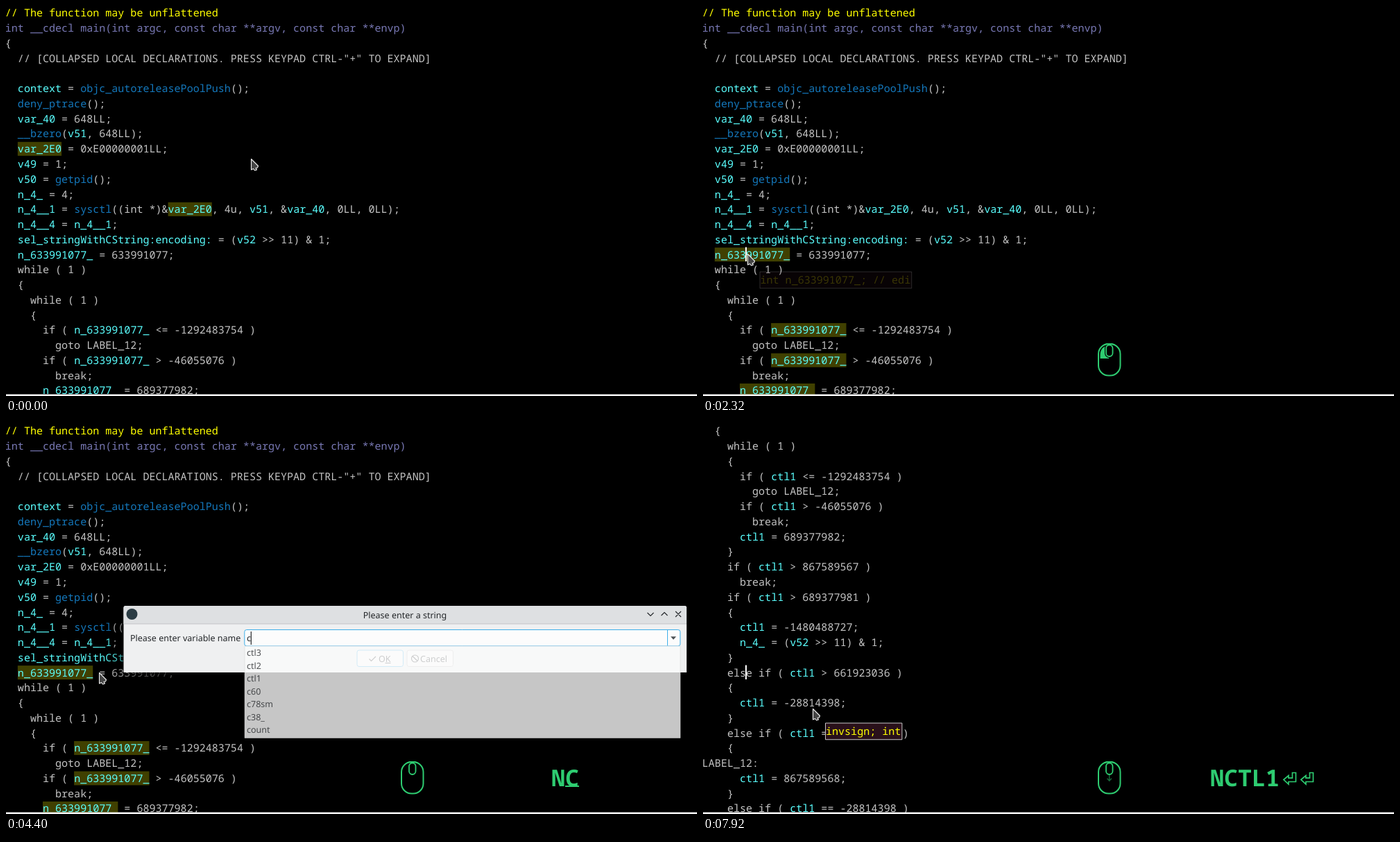
Write an HTML page with a canvas that moves like this. It is 996 px wide and 562 px high and loops after 8000 ms.

```html
<!DOCTYPE html>
<html lang="en">
<head>
<meta charset="utf-8">
<title>Renaming a variable</title>
<style>
html, body { margin: 0; width: 100%; height: 100%; overflow: hidden; background: #000; }
canvas { display: block; }
</style>
</head>
<body>
<canvas id="stage" width="996" height="562"></canvas>
<script>
const ctx = document.getElementById('stage').getContext('2d');
ctx.textRendering = 'geometricPrecision';

const LOOP = 8000, STEP = 80, BLINK = 267;
const CHAR = 9.03, LINE = 21.76, LEFT = -1.2, BASE = 15.4, CODE_BOTTOM = 560;
const MONO = '15.05px "Noto Sans Mono", monospace';
const SANS = '12.5px "Noto Sans", sans-serif';
const KEYS = 'bold 33.3px "Noto Sans Mono", monospace';
const GREY = '#c4c4c4', CYAN = '#5affff', BLUE = '#1478bc', SLATE = '#7878b4',
      YELLOW = '#ffff00', GREEN = '#2ecc71', INK = '#232629', ACCENT = '#3daee9';
const OLD_NAME = 'n_633991077_', NEW_NAME = 'ctl1';

const CODE = `// The function may be unflattened
int __cdecl main(int argc, const char **argv, const char **envp)
{
  // [COLLAPSED LOCAL DECLARATIONS. PRESS KEYPAD CTRL-"+" TO EXPAND]

  context = objc_autoreleasePoolPush();
  deny_ptrace();
  var_40 = 648LL;
  __bzero(v51, 648LL);
  var_2E0 = 0xE00000001LL;
  v49 = 1;
  v50 = getpid();
  n_4_ = 4;
  n_4__1 = sysctl((int *)&var_2E0, 4u, v51, &var_40, 0LL, 0LL);
  n_4__4 = n_4__1;
  sel_stringWithCString:encoding: = (v52 >> 11) & 1;
  @ = 633991077;
  while ( 1 )
  {
    while ( 1 )
    {
      if ( @ <= -1292483754 )
        goto LABEL_12;
      if ( @ > -46055076 )
        break;
      @ = 689377982;
    }
    if ( @ > 867589567 )
      break;
    if ( @ > 689377981 )
    {
      @ = -1480488727;
      n_4_ = (v52 >> 11) & 1;
    }
    else if ( @ > 661923036 )
    {
      @ = -28814398;
    }
    else if ( @ == 661923037 )
    {
LABEL_12:
      @ = 867589568;
    }
    else if ( @ == -28814398 )`;
const TOKEN = /\b(objc_autoreleasePoolPush|deny_ptrace|__bzero|getpid|sysctl)\b|\b(context|var_\w+|v\d\d|n_\w+|ctl1)\b|sel_\w+:encoding:/g;

const clamp = v => Math.min(1, Math.max(0, v));
const ramp = (t, a, b) => clamp((t - a) / (b - a));
const during = (t, a, b) => t >= a && t < b;
const pulse = (t, in0, in1, out0, out1) => Math.min(ramp(t, in0, in1), 1 - ramp(t, out0, out1));
const blinkOn = (t, since) => Math.floor((t - since) / BLINK) % 2 === 0;
const smooth = u => u * u * (3 - 2 * u);
const accelerate = u => u ** 1.8;

function rect(x, y, w, h, color) {
  ctx.fillStyle = color;
  ctx.fillRect(x, y, w, h);
}

function text(str, x, y, color, font, align = 'left') {
  ctx.font = font;
  ctx.fillStyle = color;
  ctx.textAlign = align;
  ctx.fillText(str, x, y);
}

function box(x, y, w, h, r, fill, stroke, width = 1) {
  ctx.beginPath();
  ctx.roundRect(x, y, w, h, r);
  if (fill) { ctx.fillStyle = fill; ctx.fill(); }
  if (stroke) { ctx.strokeStyle = stroke; ctx.lineWidth = width; ctx.stroke(); }
}

function line(path, color, width = 1) {
  ctx.strokeStyle = color;
  ctx.lineWidth = width;
  ctx.stroke(new Path2D(path));
}

function withAlpha(alpha, draw) {
  if (alpha <= 0) return;
  ctx.save();
  ctx.globalAlpha *= alpha;
  draw();
  ctx.restore();
}

// Pointer stops: time, x, y, easing towards that stop
const STOPS = [
  [40, 353, 220], [500, 107, 8, smooth], [640, 107, 8, smooth], [1040, 316, 7, accelerate],
  [1440, 316, 7, smooth], [2000, 64, 357, smooth], [2480, 64, 357, smooth],
  [2720, 134, 358, smooth], [7260, 134, 358, smooth], [7500, 158, 410, smooth]
];

function pointerAt(t) {
  const next = STOPS.findIndex(s => s[0] > t);
  if (next === 0) return STOPS[0].slice(1, 3);
  if (next < 0) return STOPS.at(-1).slice(1, 3);
  const [t0, x0, y0] = STOPS[next - 1], [t1, x1, y1, ease] = STOPS[next];
  const u = ease(ramp(t, t0, t1));
  return [x0 + (x1 - x0) * u, y0 + (y1 - y0) * u];
}

function drawCode(t, pointerX) {
  const name = t < 6160 ? OLD_NAME : NEW_NAME;
  const top = 3 * Math.floor(clamp((t - 7280) / 480) * 6);
  const marked = t < 600 ? 'var_2E0' : during(t, 2160, 6160) ? OLD_NAME : null;
  ctx.save();
  ctx.beginPath();
  ctx.rect(0, 0, 996, CODE_BOTTOM);
  ctx.clip();
  CODE.replaceAll('@', name).split('\n').slice(top, top + 26).forEach((row, i) => {
    const y = i * LINE;
    const put = (str, col, color) => text(str, LEFT + col * CHAR, y + BASE, color, MONO);
    const index = top + i;
    if (index < 2) return put(row, 0, index ? SLATE : YELLOW);
    let col = 0;
    for (const m of row.matchAll(TOKEN)) {
      put(row.slice(col, m.index), col, GREY);
      if (m[0] === marked) rect(LEFT + m.index * CHAR, y, m[0].length * CHAR, 20, '#404000');
      put(m[0], m.index, m[1] ? BLUE : CYAN);
      col = m.index + m[0].length;
    }
    put(row.slice(col), col, GREY);
  });
  if (during(t, 640, 2160)) drawSelection(t, pointerX);
  const caret = during(t, 2160, 3500) && (t < 2419 || blinkOn(t, 2419)) || t >= 6180 && blinkOn(t, 6180);
  if (caret) rect(61, 347.5, 2, 20.5, '#fff');
  ctx.restore();
  rect(0, CODE_BOTTOM - .5, 996, 3, '#f4f4f4');
}

function drawSelection(t, pointerX) {
  const first = 12;
  const last = t < 1040 ? Math.max(first, Math.round((pointerX - LEFT) / CHAR)) : 35;
  const x = LEFT + first * CHAR;
  rect(x, 0, (last - first) * CHAR, 20, '#a6a6a6');
  text(CODE.split('\n')[0].slice(first, last), x, BASE, '#fff', MONO);
  if (t < 1040 || blinkOn(t, 1040)) rect(LEFT + last * CHAR - 1, 0, 2, 20, '#fff');
}

function drawTooltip(alpha, x, y, rows) {
  withAlpha(alpha, () => {
    const w = Math.max(...rows.map(r => r.length)) * CHAR + 2;
    box(x + .5, y + .5, w, rows.length * LINE + 2, 0, '#29101a', '#c8c8c8');
    rows.forEach((r, i) => text(r, x + 1, y + 17 + i * LINE, YELLOW, MONO));
  });
}

function drawTooltips(t) {
  drawTooltip(pulse(t, 1170, 1320, 1440, 1620), 333.5, 27.5, [
    '',
    '   0: 0004 edi        int argc;',
    '   1: 0008 rsi        const char **argv;',
    '   2: 0008 rdx        const char **envp;',
    '  RET 0004 eax        int;',
    '  TOTAL STKARGS SIZE: 0'
  ]);
  drawTooltip(pulse(t, 2290, 2440, 2500, 2680), 81.5, 382.5, ['int ' + OLD_NAME + '; // edi']);
  drawTooltip(pulse(t, 2800, 2950, 3480, 3600), 151.5, 377.5, ['int']);
  drawTooltip(ramp(t, 7760, 7910), 176, 430.5, ['invsign; int']);
}

function typedName(t) {
  if (t < 4320) return OLD_NAME;
  return NEW_NAME.slice(0, [4320, 4800, 4960, 5040].filter(k => t >= k).length);
}

function drawDialog(t) {
  const name = typedName(t);
  ctx.save();
  ctx.shadowColor = 'rgba(0,0,0,.95)';
  ctx.shadowBlur = 34;
  ctx.shadowOffsetY = 12;
  box(169.5, 262, 811.5, 96, [3, 3, 0, 0], '#eff0f1');
  ctx.restore();
  box(169.5, 262, 811.5, 26, [3, 3, 0, 0], '#dee0e2');
  rect(169.5, 287.5, 811.5, 1, '#c3c5c7');
  ctx.beginPath();
  ctx.arc(181.5, 274, 8, 0, 7);
  ctx.fillStyle = '#2b3c44';
  ctx.fill();
  text('Please enter a string', 575, 279.5, INK, SANS, 'center');
  line('M924.5 272l4.5 4.5 4.5-4.5M944.5 276l4.5-4.5 4.5 4.5M965 270l8 8m0-8l-8 8', INK, 1.1);

  text('Please enter variable name', 179, 313.3, INK, SANS);
  box(343.8, 296.5, 628, 23.5, 3, '#fcfcfc', ACCENT);
  line('M953.5 297v22.5', ACCENT);
  ctx.fillStyle = '#4d5256';
  ctx.fill(new Path2D('M958 306.3h8l-4 4.4z'));
  ctx.font = SANS;
  const end = 347 + ctx.measureText(name).width;
  const selected = t < 4320;
  if (selected) rect(347, 299, end - 347, 19, ACCENT);
  text(name, 347, 313.3, selected ? '#fcfcfc' : INK, SANS);
  const since = [3613, 4290, 4790, 4950, 5030].findLast(k => t >= k) ?? 3500;
  if (blinkOn(t, since)) rect(end - .3, 299, 1.2, 19, INK);

  box(506, 326, 66.5, 23.5, 3, '#fcfcfc', ACCENT);
  line('M523.5 338.5l3 3 6.5-6.5', INK, 1.1);
  text('OK', 537, 342.5, INK, SANS);
  rect(546.5, 344, 8, 1, INK);
  box(578, 326, 66.5, 23.5, 3, '#fcfcfc', '#bcbebf');
  line('M584.5 338a5 5 0 1 0 10 0a5 5 0 1 0-10 0M586 334.5l7 7', INK, 1.1);
  text('Cancel', 597, 342.5, INK, SANS);

  const items = ['ctl3', 'ctl2', 'ctl1', 'c60', 'c78sm', 'c38_', 'count'].filter(s => s.startsWith(name));
  withAlpha(pulse(t, 4270, 4435, 5560, 5800), () => {
    box(344, 320, 628, items.length * 18.5 + 3, 0, '#fcfcfc', '#d0d2d3', .6);
    items.forEach((s, i) => text(s, 347, 334 + i * 18.5, INK, SANS));
  });
}

function drawMouse(t) {
  if (t < 600) return;
  box(570, 487, 31.5, 45.5, 14.5, '#000', GREEN, 2);
  const pressed = Math.max(pulse(t, 599, 600, 1150, 1230), pulse(t, 2150, 2160, 2400, 2480));
  withAlpha(pressed, () => {
    ctx.fillStyle = GREEN;
    ctx.fill(new Path2D('M585 489.5C577 489.5 572.5 495 572.5 503V508H585Z'));
  });
  box(579, 486.5, 13.5, 20.5, 6.5, '#000');
  box(581, 488.5, 9.5, 16.5, 4.7, null, GREEN, 1.8);
  line('M578 488.3q7.7-2.6 15.5 0', GREEN, 2);
  withAlpha(pulse(t, 7279, 7280, 7840, 8000), () => line('M585.7 506v8m-3.2-3.2l3.2 3.4 3.2-3.4', GREEN, 1.5));
}

// Key presses: time, glyph, release time
const PRESSES = [
  [3520, 'N', 3680], [4320, 'C', 4480], [4800, 'T', 4880], [4960, 'L', 5040],
  [5040, '1', 5200], [5600, '⏎', 5760], [6160, '⏎', 6240]
];

function drawKeys(t) {
  const shown = PRESSES.filter(p => t >= p[0]);
  const widthOf = p => p[1] === '⏎' ? 25 : 20;
  let x = 806 - shown.reduce((sum, p) => sum + widthOf(p), 0) / 2;
  for (const p of shown) {
    if (p[1] === '⏎') {
      ctx.save();
      ctx.translate(x, 0);
      line('M6 512.5l7-6v3.7h5.5V502.500h5V515.500H13v3.500z', GREEN, 1.7);
      ctx.restore();
    } else {
      text(p[1], x, 521.5, GREEN, KEYS);
    }
    if (t < p[2]) rect(x, 521, widthOf(p), 2, GREEN);
    x += widthOf(p);
  }
}

function drawPointer(x, y) {
  ctx.save();
  ctx.translate(x, y);
  const shape = new Path2D('M.5 .5L10.500 10.500 9.500 13 7 13.500 8.500 16 5.500 17 3.500 14.500.5 16Z');
  ctx.fillStyle = '#454545';
  ctx.fill(shape);
  ctx.strokeStyle = '#f2f2f2';
  ctx.lineWidth = 1.1;
  ctx.lineJoin = 'round';
  ctx.stroke(shape);
  ctx.restore();
}

function draw(t) {
  const [px, py] = pointerAt(t);
  rect(0, 0, 996, 562, '#000');
  drawCode(t, px);
  drawTooltips(t);
  withAlpha(pulse(t, 3500, 3650, 6150, 6230), () => drawDialog(t));
  drawMouse(t);
  drawKeys(t);
  drawPointer(px, py);
}

let start;
function tick(now) {
  start ??= now;
  const t = (now - start) % LOOP;
  draw(Math.floor(t / STEP) * STEP);
  requestAnimationFrame(tick);
}
requestAnimationFrame(tick);
</script>
</body>
</html>
```
